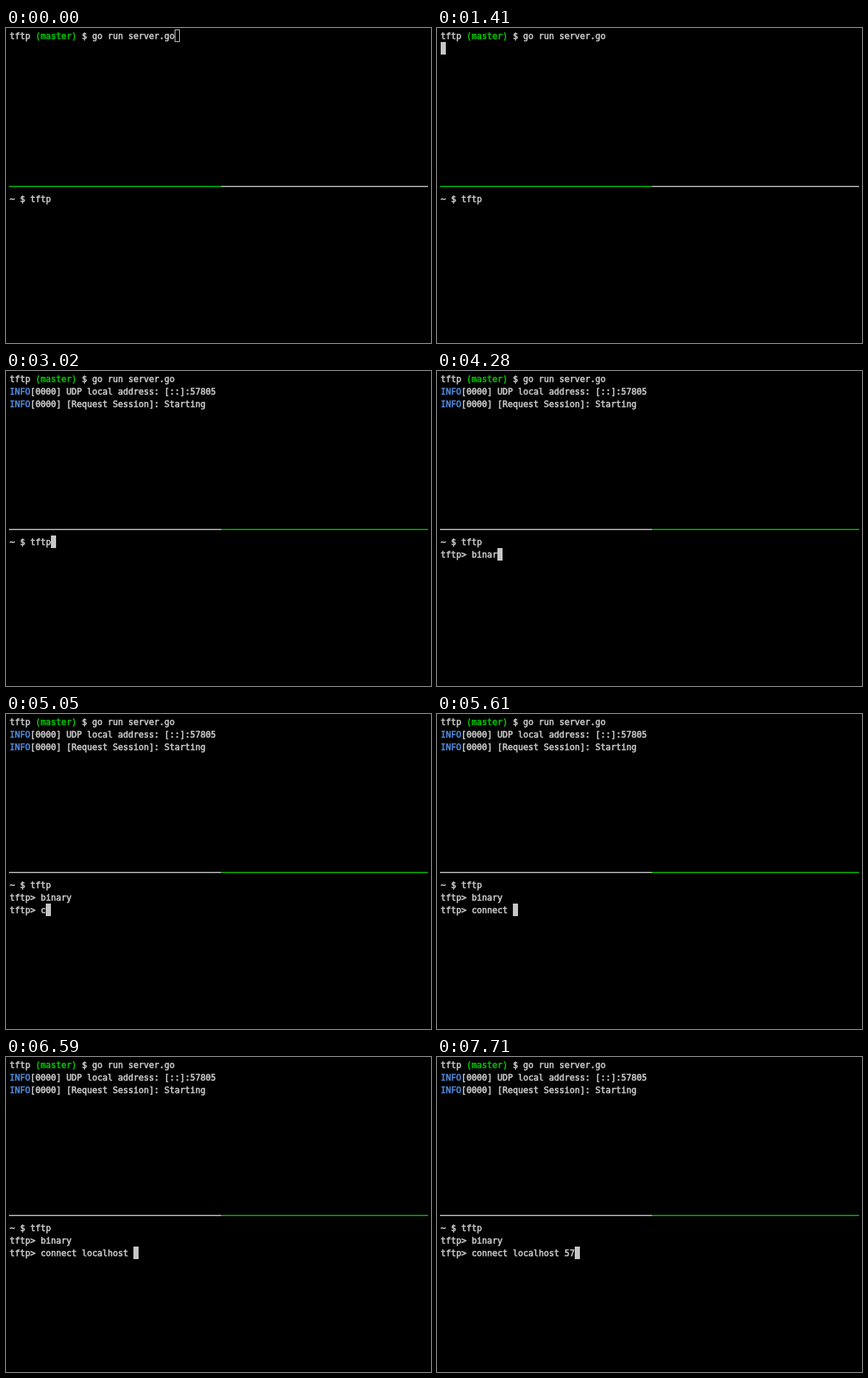
These frames come from a looping animation (577 by 427 pixels, 8 s). An HTML page with a canvas:

```html
<!DOCTYPE html>
<html lang="en">
<head>
<meta charset="utf-8">
<title>TFTP terminal session</title>
<style>
  html, body { margin: 0; width: 100%; height: 100%; overflow: hidden; background: #000; }
  canvas { display: block; }
</style>
</head>
<body>
<canvas id="screen" width="577" height="427"></canvas>
<script>
const ctx = document.getElementById('screen').getContext('2d');
const LOOP = 8000, CELL_W = 7, CELL_H = 17, LEFT = 5, TOP = 2;
const GREY = '#c7c7c7', GREEN = '#00c200', BLUE = '#5087d5';

// Key moments of the session, in ms
const FOCUS = 500, RUN = 1410, READY = 1760, SWITCH = 3020, CLIENT = 3370, ENTER = 4560;

const cellX = col => LEFT + col * CELL_W;
const cellY = row => TOP + row * CELL_H;

// Types text at an even pace; its first and last keys land at the given times
function type(text, first, last, t) {
  if (t < first) return '';
  const keys = Math.floor((t - first) * (text.length - 1) / (last - first)) + 1;
  return text.slice(0, keys);
}

// Draws [text, colour] runs on the character grid; returns the next column
function print(row, ...runs) {
  let col = 0;
  for (const [text, color = GREY] of runs) {
    ctx.fillStyle = ctx.strokeStyle = color;
    for (const char of text) {
      const x = cellX(col++), y = cellY(row) + 13;
      ctx.fillText(char, x, y);
      ctx.strokeText(char, x, y);
    }
  }
  return col;
}

function bar(x, y, w, h, color) {
  ctx.fillStyle = color;
  ctx.fillRect(x, y, w, h);
}

function cursor(col, row, focused = true) {
  const x = cellX(col), y = cellY(row);
  bar(x, y, CELL_W, CELL_H, GREY);
  if (!focused) bar(x + 1, y + 1, CELL_W - 2, CELL_H - 2, '#000');
}

function drawServer(t) {
  const end = print(0, ['tftp '], ['(master)', GREEN], [' $ go run server.go']);
  if (t >= READY) {
    print(1, ['INFO', BLUE], ['[0000] UDP local address: [::]:57805']);
    print(2, ['INFO', BLUE], ['[0000] [Request Session]: Starting']);
  }
  if (t < RUN) cursor(end, 0, t >= FOCUS);
  else if (t < READY) cursor(0, 1);
  else if (t < SWITCH) cursor(0, 3);
}

function drawClient(t) {
  let row = 13;
  let end = print(row, ['~ $ tftp']);
  if (t >= CLIENT) end = print(++row, ['tftp> ' + type('binary', 3930, 4350, t)]);
  if (t >= ENTER) {
    const command = type('connect ', 4980, 5610, t) + type('localhost ', 5750, 6590, t) + type('57', 7500, 7710, t);
    end = print(++row, ['tftp> ' + command]);
  }
  if (t >= SWITCH) cursor(end, row);
}

function draw(now) {
  const t = now % LOOP;
  const lower = t >= SWITCH;
  bar(0, 0, 577, 427, '#000');
  ctx.font = '11.63px "DejaVu Sans Mono", monospace';
  ctx.lineWidth = 0.6;
  ctx.lineJoin = 'round';
  bar(4, 214, 288, 1.5, lower ? GREY : GREEN);
  bar(292, 214, 281, 1.5, lower ? GREEN : GREY);
  drawServer(t);
  drawClient(t);
}

const start = performance.now();
function frame() {
  draw(performance.now() - start);
  requestAnimationFrame(frame);
}
frame();
</script>
</body>
</html>
```
